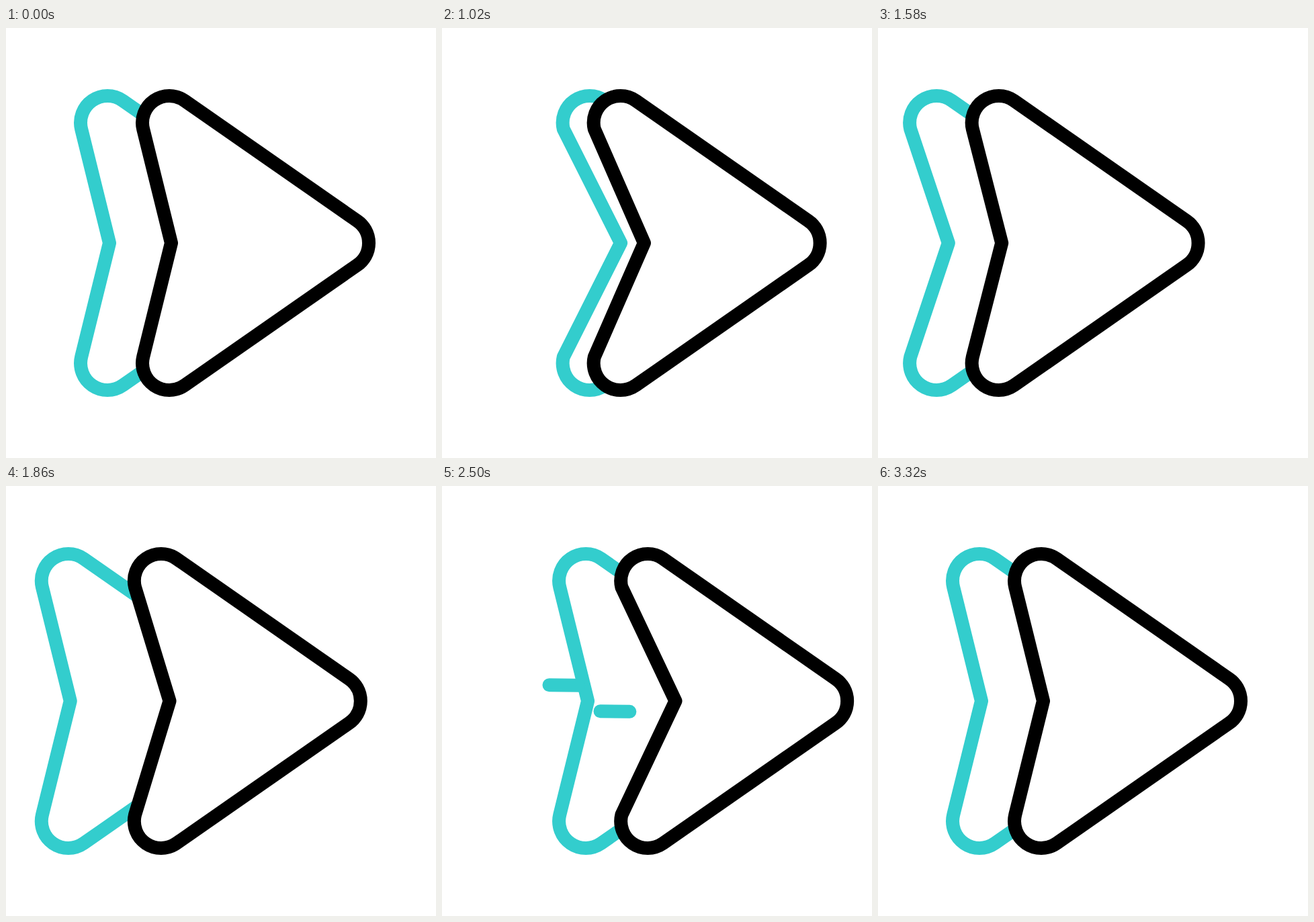
Animation of 640 by 640 pixels, one loop 3600 ms. Source, as an HTML page:

```html
<!DOCTYPE html>
<html lang="en">
<head>
<meta charset="utf-8">
<title>Send arrow</title>
<style>
  html, body { margin: 0; width: 100%; height: 100%; overflow: hidden; background: #fff; }
  svg { display: block; width: 100%; height: 100%; }
  path { stroke-width: 20; stroke-linecap: round; stroke-linejoin: round; fill: none; stroke: #33cdcd; }
  #front { stroke: #000; fill: #fff; }
</style>
</head>
<body>
<svg viewBox="0 0 640 640">
  <path id="back"/>
  <path id="front"/>
  <path id="bars"/>
</svg>
<script>
const LOOP = 3600, LAG = 240;
const [back, front, bars] = ['back', 'front', 'bars'].map(id => document.getElementById(id));

const clamp = u => Math.min(1, Math.max(0, u));
const smooth = u => (u = clamp(u), u * u * (3 - 2 * u));

// Horizontal sway as [time, offset] keys, eased in and out
const sway = [[200, 0], [760, 69], [1440, -72], [2377, 69], [3070, 0]];
function swayAt(t) {
  let x = 0;
  for (let i = 1; i < sway.length; i++) {
    const [t0, x0] = sway[i - 1], [t1, x1] = sway[i];
    x += (x1 - x0) * smooth((t - t0) / (t1 - t0));
  }
  return x;
}

// The notch accelerates inwards, then relaxes evenly
function notchAt(t, start, peak, power) {
  return t < peak ? 45 * clamp((t - start) / (peak - start)) ** power
                  : 45 * clamp(1 - (t - peak) / 820);
}

function arrow(x, notch) {
  return `M${x + 43 + notch} 320L${x + 1.2} 150.6A40 40 0 0 1 ${x + 62.9} 108.2` +
    `L${x + 319.9} 287.2A40 40 0 0 1 ${x + 319.9} 352.8` +
    `L${x + 62.9} 531.8A40 40 0 0 1 ${x + 1.2} 489.4Z`;
}

// Speed lines run from right to left, the tail chasing the head
function streaks(t, start) {
  const right = 409.5, length = 250, time = 360;
  const head = right - length * smooth((t - start) / time);
  const tail = right - length * smooth((t - start - 203) / time);
  if (tail - head < 0.1) return '';
  const line = (dx, dy) => {
    const point = x => `${x + dx} ${297 + dy + (x - 214) * 0.0137}`;
    return `M${point(head)}L${point(tail)}`;
  };
  return line(0, 0) + line(76, 39);
}

function draw() {
  const t = performance.now() % LOOP, late = t - LAG;
  back.setAttribute('d', arrow(111 + swayAt(late), notchAt(late, 200, 790, 2.2)));
  front.setAttribute('d', arrow(203 + swayAt(t),
    notchAt(t, 200, 790, 2.2) + notchAt(t, 1600, 2380, 1.4)));
  bars.setAttribute('d', streaks(t, 428) + streaks(t, 2034));
  requestAnimationFrame(draw);
}
draw();
</script>
</body>
</html>
```
